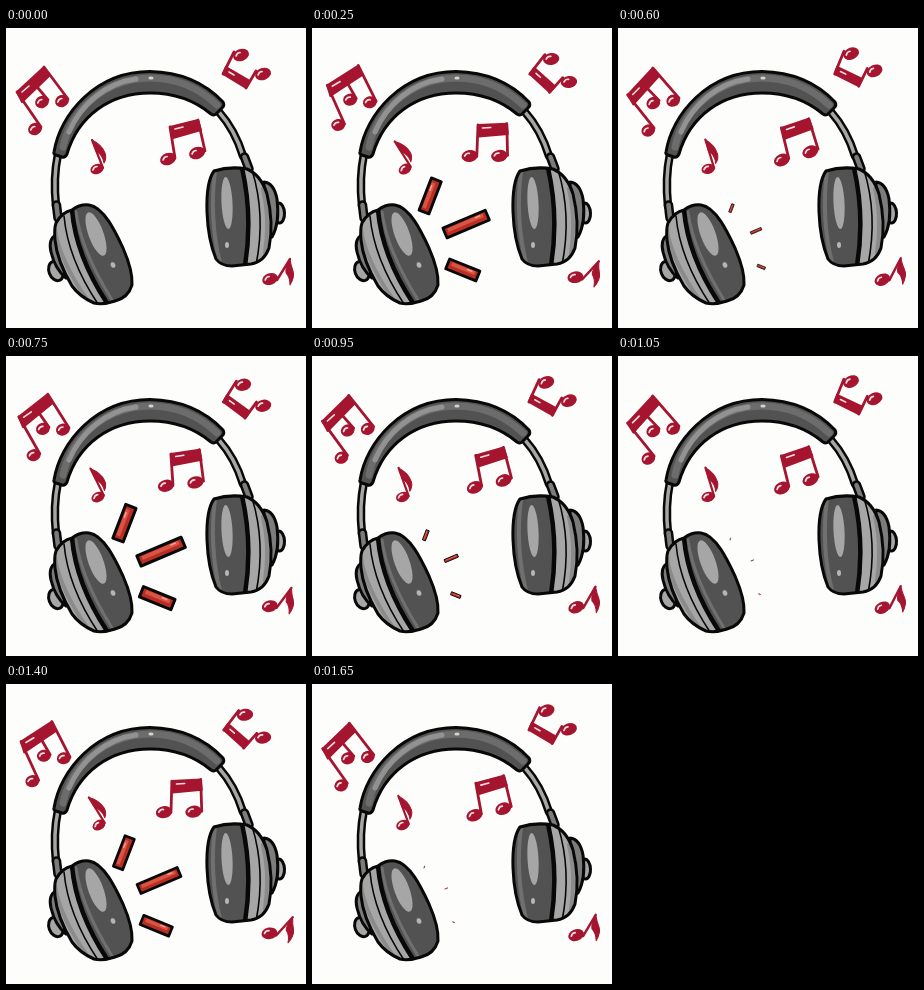
An HTML page with a canvas that plays this animation: 300x300 px, repeating every 1700 ms.

```html
<!DOCTYPE html>
<html>
<head>
<meta charset="utf-8">
<style>
html, body { margin: 0; width: 100%; height: 100%; overflow: hidden; background: #fdfefc; }
canvas { display: block; width: 300px; height: 300px; }
</style>
</head>
<body>
<canvas id="stage" width="300" height="300"></canvas>
<script>
const ctx = document.getElementById('stage').getContext('2d');
const LOOP = 1700, BEAT = LOOP / 3;
const INK = '#080808', RED = '#a5152f', PALE = '#f3dfe2';
const DARK = '#525252', MID = '#7c7c7c', LIGHT = '#a6a6a6';

// Keys are [time, value], with 17 time units in one beat.
const SWING = [[0, 0], [2.4, 1], [7.2, -1], [13.7, 0.55], [16.2, 0], [17, 0]];
const GROW = [[0, 0], [3.2, 1], [6.5, 1], [14, 0.06], [16.4, 0.06], [17, 0]];

function valueAt(keys, t) {
  const i = Math.max(1, keys.findIndex(k => k[0] >= t));
  const [t0, a] = keys[i - 1], [t1, b] = keys[i];
  return a + (b - a) * (1 - Math.cos(Math.PI * (t - t0) / (t1 - t0))) / 2;
}

function shape(d, fill, stroke, width = 3) {
  const path = new Path2D(d);
  if (fill) { ctx.fillStyle = fill; ctx.fill(path); }
  if (stroke) { ctx.strokeStyle = stroke; ctx.lineWidth = width; ctx.stroke(path); }
}

function oval(x, y, rx, ry, deg, fill, stroke, width = 3) {
  ctx.beginPath();
  ctx.ellipse(x, y, rx, ry, deg * Math.PI / 180, 0, Math.PI * 2);
  if (fill) { ctx.fillStyle = fill; ctx.fill(); }
  if (stroke) { ctx.strokeStyle = stroke; ctx.lineWidth = width; ctx.stroke(); }
}

function tube(d, color, width) {
  shape(d, null, INK, width + 5);
  shape(d, null, color, width);
}

// Fills an outline, paints details clipped to it, then inks its edge.
function shaded(outline, fill, details) {
  shape(outline, fill);
  ctx.save();
  ctx.clip(new Path2D(outline));
  details();
  ctx.restore();
  shape(outline, null, INK, 3);
}

function headband() {
  tube('M52 126 Q47 150 50 178', LIGHT, 3.5);
  tube('M213 84 Q229 102 237 128', LIGHT, 3.5);
  tube('M50.5 177 L52 190', MID, 4.5);
  tube('M238.5 129 L243 141', MID, 4.5);
  const band = 'M48 124 C54 86 90 43.5 144 43.5 C174 44 199 55 217 74 Q219 77 216 80 ' +
    'L210 86 Q208 88 205 86 C187 71 166 65 144 65 C104 65 72 88 61 126 Q59 130 56 129 L50 127 Q47 126 48 124 Z';
  shaded(band, DARK, () => {
    shape('M57 119 C64 85 96 51 144 50 C170 50 193 60 211 77', null, '#6c6c6c', 7);
    shape('M63 104 C75 76 100 55 130 51', null, '#929292', 5);
  });
  oval(145, 50, 2.6, 1.6, 0, '#d4d4d4');
}

function leftCup() {
  oval(50, 243, 7, 10, -20, LIGHT, INK);
  shape('M50 207 Q42 211 45 224 Q49 241 60 250 Z', MID, INK);
  const cup = 'M50 195 Q56 184 66 182 Q74 176 83 177 C98 179 110 205 117 220 ' +
    'Q127 243 126 257 Q122 270 109 273 Q97 277 88 275 Q74 269 66 258 Q51 233 49 212 Q48 201 50 195 Z';
  shaded(cup, LIGHT, () => {
    shape('M49 202 Q54 233 82 273', null, '#8b8b8b', 4);
    shape('M66 181 Q69 228 101 275 L135 275 L125 215 L85 170 Z', DARK);
    shape('M70 184 Q75 222 106 272', null, '#707070', 3);
    shape('M58 188 Q62 231 92 276', null, INK, 1.6);
    shape('M66 182 Q70 228 101 275', null, INK, 4.5);
    oval(90, 206, 7.5, 23, -20, LIGHT);
    oval(107, 237, 2.3, 2.8, -20, '#b5b5b5');
  });
}

function rightCup() {
  oval(273, 185, 5.5, 10, -3, LIGHT, INK);
  shape('M258 154 Q268 155 271 171 Q274 195 266 209 L258 211 Z', MID, INK);
  const cup = 'M208 143 Q224 138 241 141 Q255 147 261 166 Q268 195 263 220 ' +
    'Q258 234 245 236 L226 238 Q215 238 210 231 Q202 212 201 184 Q200 154 208 143 Z';
  shaded(cup, LIGHT, () => {
    shape('M200 138 H235 Q247 187 239 240 H200 Z', DARK);
    shape('M209 143 Q203 190 214 235', null, '#707070', 4);
    shape('M236 140 Q247 188 239 238', null, INK, 4.5);
    shape('M246 142 Q260 187 250 237', null, INK, 1.6);
    shape('M257 161 Q264 190 259 225', null, '#8b8b8b', 4);
    oval(221, 175, 5.5, 26, -3, LIGHT);
    oval(221, 217, 2, 3, 0, '#b5b5b5');
  });
}

function swing(x, y, degrees, draw) {
  ctx.save();
  ctx.translate(x, y);
  ctx.rotate(degrees * Math.PI / 180);
  ctx.translate(-x, -y);
  draw();
  ctx.restore();
}

function heads(list, rx, ry) {
  for (const [x, y] of list) {
    oval(x, y, rx, ry, -20, RED);
    shape(`M${x - rx * 0.6} ${y + 1} q1 -3.5 4 -3.5`, null, PALE, 1.7);
  }
}

function notes(s) {
  swing(50, 84, -10.5 * s, () => {
    shape('M11 64 L38 39 L43 48 L16 74 Z', RED, RED, 2);
    shape('M11 64 L35 99 M27 54 L42 72 M38 39 L62 71', null, RED, 2.8);
    heads([[29, 101], [36, 74], [56, 73]], 7, 6);
    shape('M16 64 L23 58', null, PALE, 1.6);
  });
  swing(217, 50, -11.5 * s, () => {
    shape('M217 46 L240 60 L244 53 L220 39 Z', RED, RED, 2);
    shape('M217 46 L228 24 M240 60 L250 43', null, RED, 2.8);
    heads([[235, 27], [257, 46]], 8.2, 6);
    shape('M223 44 L228 47', null, PALE, 1.6);
  });
  swing(175, 108, -11.5 * s, () => {
    shape('M164 99 L192 92 L195 102 L167 110 Z', RED, RED, 2);
    shape('M164 99 L169 130 M192 92 L199 123', null, RED, 2.8);
    heads([[162, 131], [191, 125]], 8.2, 6);
    shape('M169 101 L177 99', null, PALE, 1.6);
  });
  swing(92, 130, 11 * s, () => {
    shape('M86 112 L97 140', null, RED, 2.2);
    shape('M86 112 Q96 117 99 125 Q101 130 98 135 Q97 127 90 123 Z', RED, RED, 1);
    heads([[91, 141]], 6.8, 5);
  });
  swing(273, 247, -11 * s, () => {
    shape('M284 231 L271 252', null, RED, 2.4);
    shape('M284 231 Q285 238 287 243 Q289 249 284 257 Q284 249 280 245 Q279 240 284 231 Z', RED, RED, 1);
    heads([[264, 251]], 8, 5.8);
  });
}

function bar(x, y, deg, start, length, scale) {
  ctx.save();
  ctx.translate(x, y);
  ctx.rotate(deg * Math.PI / 180);
  ctx.scale(scale, scale);
  ctx.beginPath();
  ctx.rect(start, -5.5, length, 11);
  ctx.fillStyle = '#b92d25';
  ctx.fill();
  ctx.fillStyle = '#d85443';
  ctx.fillRect(start + 4, -3.5, length - 8, 4);
  ctx.fillStyle = '#eda497';
  ctx.fillRect(start + length - 13, -3, 6, 1.5);
  ctx.strokeStyle = INK;
  ctx.lineWidth = 3;
  ctx.stroke();
  ctx.restore();
}

function draw(now) {
  const t = (now % LOOP) % BEAT / BEAT * 17;
  ctx.fillStyle = '#fdfefc';
  ctx.fillRect(0, 0, 300, 300);
  ctx.lineCap = ctx.lineJoin = 'round';
  headband();
  leftCup();
  rightCup();
  notes(valueAt(SWING, t));
  const size = valueAt(GROW, t);
  if (size > 0.01) {
    bar(112, 184, -69, 0, 36, size);
    bar(133, 205, -23, 0, 48, size);
    bar(141, 238, 22, -6, 34, size);
  }
}

const began = performance.now();
function tick() {
  draw(performance.now() - began);
  requestAnimationFrame(tick);
}
tick();
</script>
</body>
</html>
```
